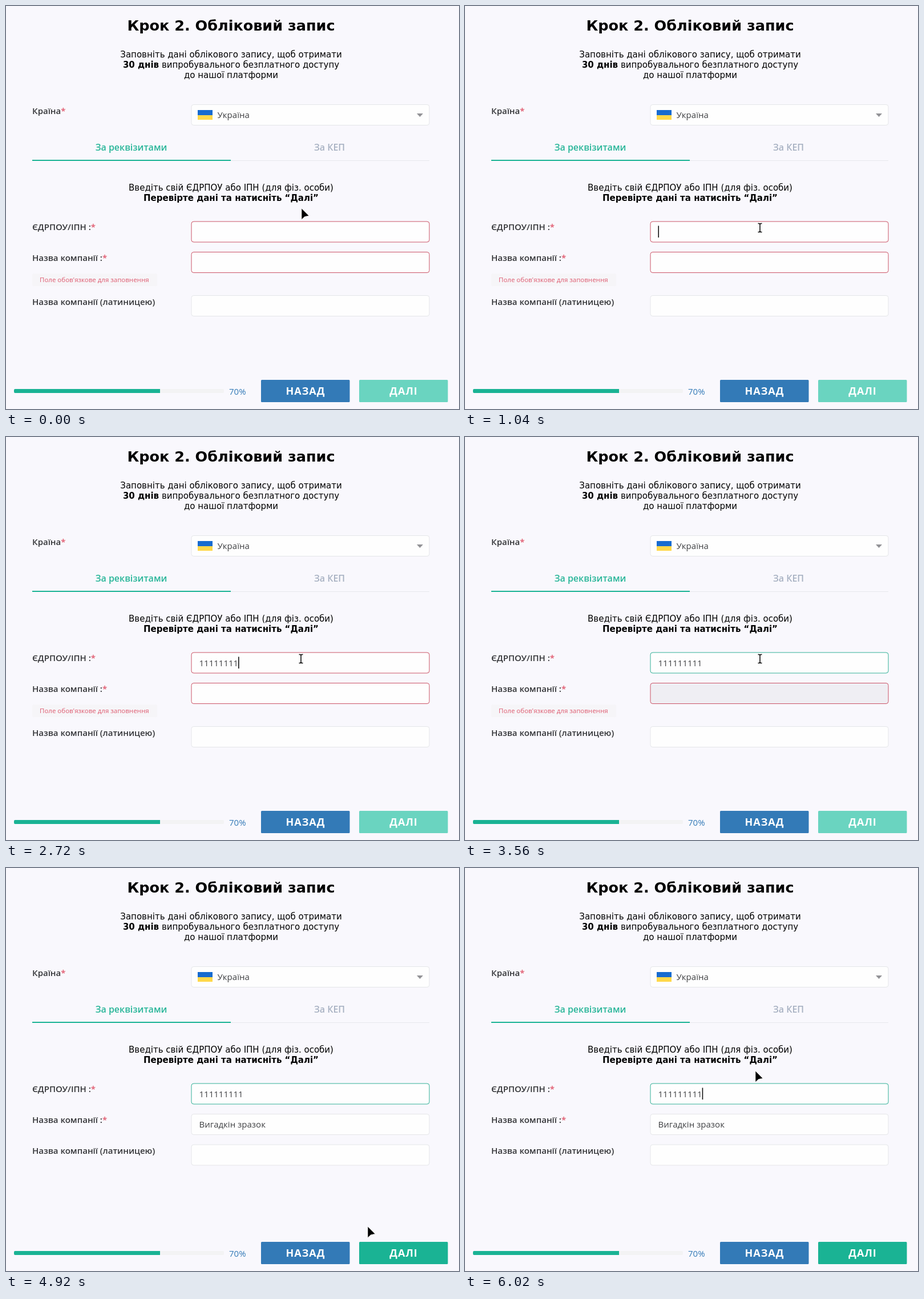
Animation, 794 px wide and 705 px high, one loop 6.06 s. Source, as an HTML page:

```html
<!DOCTYPE html>
<html lang="uk">
<head>
<meta charset="utf-8">
<title>Обліковий запис</title>
<style>
  html, body { margin: 0; width: 100%; height: 100%; overflow: hidden; background: #f9f8fd; }
  svg { display: block; width: 794px; height: 705px; }
  text { font: 15px "Open Sans", "Noto Sans", sans-serif; fill: #3f4043; white-space: pre; }
  .intro { font: 15px "DejaVu Sans", sans-serif; fill: #000; text-anchor: middle; }
  .title { font-size: 25.5px; }
  .strong { font-weight: 700; }
  .label { font-weight: 600; fill: #333437; }
  .label tspan { fill: #e0566b; }
  .tab { font-size: 16px; font-weight: 600; text-anchor: middle; }
  .button { font-size: 18px; font-weight: 700; letter-spacing: 1px; fill: #fff; text-anchor: middle; }
  .field { fill: #fefefe; stroke: #e5e6e9; }
</style>
</head>
<body>
<svg viewBox="0 0 794 705">
  <rect width="794" height="705" fill="#f9f8fd"/>

  <text class="intro title strong" x="394.5" y="43">Крок 2. Обліковий запис</text>
  <text class="intro" x="394.5" y="90">Заповніть дані облікового запису, щоб отримати</text>
  <text class="intro" x="394.5" y="108"><tspan class="strong">30 днів</tspan> випробувального безплатного доступу</text>
  <text class="intro" x="394.5" y="126">до нашої платформи</text>

  <text class="label" x="46" y="189">Країна<tspan>*</tspan></text>
  <rect class="field" x="325" y="172.5" width="417" height="36" rx="4"/>
  <path d="M336 182h26v9h-26z" fill="#176bd0"/>
  <path d="M336 191h26v8h-26z" fill="#ffd84a"/>
  <text x="370.5" y="196">Україна</text>
  <path d="M720 188h11l-5.5 6z" fill="#929296"/>

  <path d="M394 270.5H742" stroke="#e7e8ec"/>
  <path d="M46 270H394" stroke="#1ab394" stroke-width="2"/>
  <text class="tab" x="219.5" y="253" style="fill:#27b598">За реквізитами</text>
  <text class="tab" x="567" y="253" style="fill:#a7b1c2">За КЕП</text>

  <text class="intro" x="394.5" y="323">Введіть свій ЄДРПОУ або ІПН (для фіз. особи)</text>
  <text class="intro strong" x="394.5" y="341">Перевірте дані та натисніть “Далі”</text>

  <text class="label" x="46" y="392">ЄДРПОУ/ІПН :<tspan>*</tspan></text>
  <rect id="codeField" class="field" x="325" y="377" width="417" height="36" rx="4"/>
  <text id="code" x="338.5" y="400.5"></text>
  <path id="caret" d="M0 384.5V405" stroke="#111" stroke-width="1.6"/>

  <text class="label" x="46" y="446">Назва компанії :<tspan>*</tspan></text>
  <rect id="companyField" class="field" x="325" y="430.5" width="417" height="36" rx="4"/>
  <text id="company" x="338.5" y="454">Вигадкін зразок</text>

  <g id="error">
    <rect x="46" y="468" width="219" height="22" rx="3" fill="#f6f5f8"/>
    <text x="59" y="483" style="font-size:11.5px;fill:#de5b70">Поле обов'язкове для заповнення</text>
  </g>

  <g id="latin">
    <text class="label" x="46" y="500">Назва компанії (латиницею)</text>
    <rect class="field" x="325" y="484" width="417" height="36" rx="4"/>
  </g>

  <rect x="14" y="670" width="368" height="7" rx="2" fill="#f3f3f4"/>
  <path d="M16 670H270V677H16a2 2 0 0 1-2-2V672a2 2 0 0 1 2-2z" fill="#1ab394"/>
  <text x="391" y="679.5" style="fill:#337ab7">70%</text>

  <rect x="447" y="654" width="155.5" height="39" rx="1.5" fill="#337ab7"/>
  <text class="button" x="525" y="680">НАЗАД</text>
  <rect id="next" x="619" y="654" width="155.5" height="39" rx="1.5"/>
  <text class="button" x="697" y="680">ДАЛІ</text>

  <g id="cursor" stroke-linejoin="round">
    <path id="arrow" d="M0 0V19.5L5.5 14.5L13 13Z" fill="#000" stroke="#fff" stroke-width=".6"/>
    <path id="beam" d="M-3.5-7.5H-1.5L0-6.5L1.5-7.5H3.5M0-6.5V6.5M-3.5 7.5H-1.5L0 6.5L1.5 7.5H3.5" fill="none" stroke="#111" stroke-width="1.6"/>
    <path id="hand" d="M-2 0Q0-2 2 0V5L8 6.5Q10.5 7.5 10 10L8.5 16.5H-1L-6 10Q-6.5 7.5-4 8L-2 10Z" fill="#000" stroke="#fff" stroke-width=".6"/>
  </g>
</svg>
<script>
const LOOP = 6060;
const KEY_TIMES = [1300, 1470, 1640, 1810, 1990, 2170, 2350, 2560, 2770];
const LOOKUP_START = 2950, FILLED = 4000;
const DIGIT_WIDTH = 8.58;
const CARET_ON = [[760, 3300], [4300, 4900], [5460, LOOP]];
// time, x, y of the pointer's hot spot
const POINTER = [
  [0, 518, 354], [250, 518, 354], [640, 517, 388], [3900, 517, 388],
  [4380, 344, 409], [4440, 344, 409], [5080, 687, 667], [5600, 687, 667],
  [6000, 509, 355], [LOOP, 509, 355]
];

const el = id => document.getElementById(id);
const show = (id, on) => el(id).setAttribute("visibility", on ? "visible" : "hidden");
const within = (v, from, to) => v >= from && v < to;

function pointerAt(t) {
  const i = POINTER.findIndex((p, k) => k > 0 && t <= p[0]);
  const [t0, x0, y0] = POINTER[i - 1], [t1, x1, y1] = POINTER[i];
  const u = (t - t0) / (t1 - t0), k = u * u * (3 - 2 * u);
  return [x0 + (x1 - x0) * k, y0 + (y1 - y0) * k];
}

function pointerKind(x, y, latinTop) {
  if (within(x, 619, 775) && within(y, 654, 693)) return "hand";
  const overField = [377, 430, latinTop].some(top => within(y, top, top + 36));
  return overField && within(x, 325, 742) ? "beam" : "arrow";
}

function render(t) {
  const typed = KEY_TIMES.filter(k => t >= k).length;
  const accepted = t >= LOOKUP_START, filled = t >= FILLED;
  const latinShift = filled ? 0 : 22.5;
  const [x, y] = pointerAt(t);
  const kind = pointerKind(x, y, 484 + latinShift);

  el("code").textContent = "1".repeat(typed);
  el("caret").setAttribute("transform", `translate(${339.2 + typed * DIGIT_WIDTH})`);
  show("caret", CARET_ON.some(([from, to]) => within(t, from, to)));

  el("codeField").style.stroke = accepted ? "#32b097" : "#cb5467";
  el("companyField").style.stroke = filled ? "#e5e6e9" : "#cb5467";
  el("companyField").style.fill = accepted && !filled ? "#efeef3" : "#fefefe";
  show("company", filled);
  show("error", !filled);
  el("latin").setAttribute("transform", `translate(0 ${latinShift})`);
  el("next").style.fill = !filled ? "#6ad4c0" : kind === "hand" ? "#18a689" : "#1ab394";

  el("cursor").setAttribute("transform", `translate(${x} ${y})`);
  for (const id of ["arrow", "beam", "hand"]) show(id, id === kind);
}

const start = performance.now();
function tick() {
  render((performance.now() - start) % LOOP);
  requestAnimationFrame(tick);
}
tick();
</script>
</body>
</html>
```
